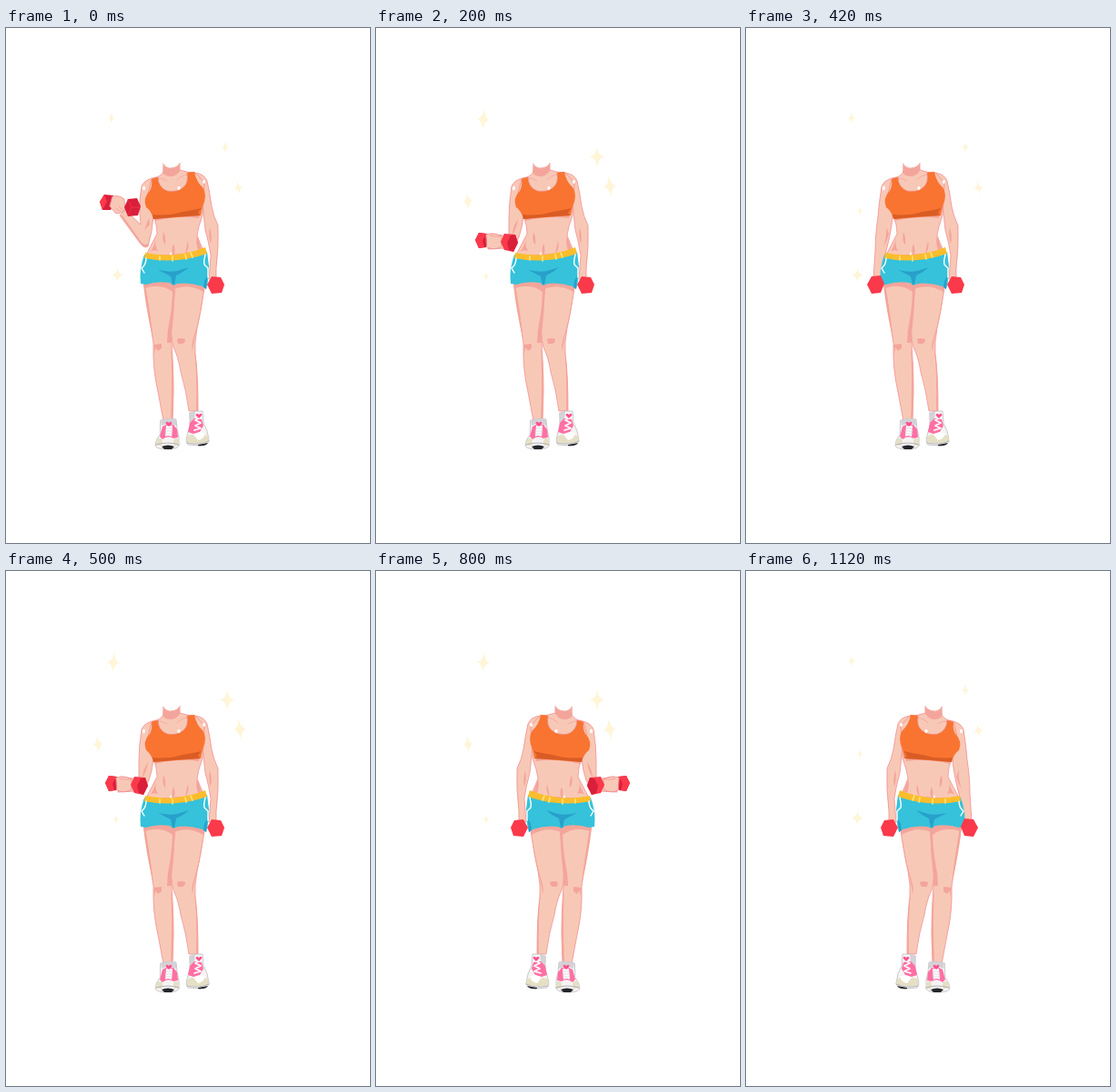
Write an HTML page with a canvas that moves like this. It is 400x566 px and loops after 1.2 s.

```html
<!DOCTYPE html>
<html lang="en">
<head>
<meta charset="utf-8">
<title>Dumbbell curls</title>
<style>
html, body { margin: 0; width: 100%; height: 100%; overflow: hidden; background: #fff; }
canvas { display: block; width: 400px; height: 566px; }
</style>
</head>
<body>
<canvas id="stage"></canvas>
<script>
const canvas = document.getElementById('stage');
const ctx = canvas.getContext('2d');
const ratio = window.devicePixelRatio || 1;
canvas.width = 400 * ratio;
canvas.height = 566 * ratio;

const SKIN = '#f8c8b6', SHADE = '#f4a59b', EDGE = '#ef858a';
const RED = '#fa394b', DEEP_RED = '#d91f3a';
const ORANGE = '#f97430', DEEP_ORANGE = '#da5c25';
const AQUA = '#35c2da', DEEP_AQUA = '#28a0cb';
const GOLD = '#fbbd2c', PINK = '#ff6fa3', HOT_PINK = '#ff4f8d';
const LEATHER = '#f5f4f2', GREY = '#d3d2d7', CREAM = '#e5dfc4', SOLE = '#25242a';

function fill(color, d) {
  ctx.fillStyle = color;
  ctx.fill(new Path2D(d));
}

function line(color, width, d) {
  ctx.strokeStyle = color;
  ctx.lineWidth = width;
  ctx.stroke(new Path2D(d));
}

function skin(d) {
  fill(SKIN, d);
  line(EDGE, 0.7, d);
}

function dot(x, y, rx, ry) {
  ctx.fillStyle = '#fff';
  ctx.beginPath();
  ctx.ellipse(x, y, rx, ry, 0, 0, Math.PI * 2);
  ctx.fill();
}

function sparkle([x, y, w, h, tilt]) {
  ctx.save();
  ctx.translate(x, y);
  ctx.rotate(tilt);
  ctx.fillStyle = '#fff5d8';
  ctx.beginPath();
  ctx.moveTo(0, -h);
  ctx.quadraticCurveTo(w * 0.12, -h * 0.12, w, 0);
  ctx.quadraticCurveTo(w * 0.12, h * 0.12, 0, h);
  ctx.quadraticCurveTo(-w * 0.12, h * 0.12, -w, 0);
  ctx.quadraticCurveTo(-w * 0.12, -h * 0.12, 0, -h);
  ctx.fill();
  ctx.restore();
}

// x, y, half width, half height, tilt
const sparkles = {
  small: [[116, 99, 4, 6.5, 0.05], [241, 131, 4, 6.5, 0.05], [255.5, 175.5, 5, 7.5, -0.2], [122.5, 271.5, 6.5, 8, 0.05], [125, 201, 3, 5.5, 0]],
  large: [[118, 100.5, 7, 12, 0.1], [243, 141.5, 8, 11.5, 0], [257, 174, 7, 12.5, -0.12], [101, 190.5, 5.5, 10, -0.1], [121, 273, 3.5, 5.5, 0]]
};

const arms = {
  up() {
    skin('M165 164Q152 166 149 174Q146 190 147 203L148 216L131 200L125 206L147 236Q152 243 156 240Q161 224 162 206L163 180Z');
    fill(SHADE, 'M126 206L147 236Q152 243 156 240L157 236Q154 240 149 236L128 206Z');
    fill(SHADE, 'M157 209L152 222L158 216Z');
  },
  mid() {
    skin('M165 164Q152 166 149 174Q146 192 146 209L146 229L126 226L123 243L143 242Q154 239 157 230Q161 219 162 206L163 180Z');
    fill(SHADE, 'M156 210Q150 219 150 227Q155 219 156 210Z');
  },
  down() {
    skin('M165 164Q152 166 149 174Q146 193 145 207Q142 228 142 244L140 275H150L153 249Q158 231 160 217L162 198Z');
    fill(SHADE, 'M154 219Q155 228 151 240Q155 234 157 226Z');
    fill(SHADE, 'M153 247L149 274H150L154 247Z');
  }
};

const weights = {
  up() {
    fill(DEEP_RED, 'M103 191L108 183L118 184L119 192L115 200L106 200Z');
    fill(RED, 'M103 191L108 183L111 191L106 200Z');
    skin('M117 185Q124 183 130 188L131 199Q125 206 120 203L114 196Z');
    line(SHADE, 1, 'M121 198L126 202M124 196L128 200');
    fill(DEEP_RED, 'M130 197L134 188L144 187L148 196L145 206L134 207Z');
    line(RED, 0.7, 'M134 188L138 197L134 206M138 197H147');
  },
  mid() {
    fill(DEEP_RED, 'M109 233L113 225L122 226L124 234L121 241L113 242Z');
    fill(RED, 'M109 233L113 225L121 226L117 234L119 241L113 242Z');
    skin('M121 227Q130 224 138 229V240Q130 245 122 241Z');
    line(SHADE, 1, 'M125 228Q132 230 138 229');
    fill(RED, 'M137 235L141 226L153 227L156 236L151 246L141 244Z');
    fill(DEEP_RED, 'M144 236L148 228L153 227L156 236L151 246L146 244Z');
  },
  down() {
    fill(RED, 'M133 282L138 273L148 272L152 281L148 291L138 292Z');
  }
};

function drawLegs() {
  skin('M186 277L219 280Q214 312 210 330Q207 346 208 358Q211 379 211 421H201Q198 398 192 378Q189 360 184 351Q180 338 182 310Z');
  fill(SHADE, 'M217 287Q213 319 207 337Q203 349 205 355Q206 344 210 330Q216 307 217 287Z');
  fill(SHADE, 'M207 353Q210 380 209 420H211Q211 379 208 358Z');
  fill(SHADE, 'M188 342Q192 340 197 342Q197 346 194 347H189Z');
  skin('M151 279L186 279Q184 307 181 337Q184 365 184 400L183 432H173L167 400Q161 374 162 347Q158 316 151 279Z');
  fill(SHADE, 'M186 283Q185 314 181 346L177 346Q177 333 180 320Q183 303 183 283Z');
  fill(SHADE, 'M181 351Q183 382 181 431H183Q186 379 181 351Z');
  fill(SHADE, 'M151 282Q154 310 162 345Q159 316 153 282Z');
  fill(SHADE, 'M162 348L171 347L171 352L167 355L164 351V358Z');
  fill(SHADE, 'M151 279H219L217 290Q202 281 187 286L183 290Q170 280 153 286Z');
}

function drawTorso() {
  skin('M173 149Q177 155 183 153Q188 153 191 148V156Q199 159 208 159L218 170L216 206Q211 219 210 228Q213 236 218 247L153 251Q160 238 166 226Q166 216 162 207L154 190L160 166Q171 163 173 158Z');
  fill('#fff', 'M172 147L173 149Q177 155 183 153Q188 153 191 148V146Z');
  fill(SHADE, 'M173 150Q177 155 183 154Q188 153 191 149V157Q186 164 180 163Q175 163 172 159Z');
  line(SHADE, 0.8, 'M165 165Q171 164 177 168M188 167Q192 162 200 161');
  fill(SHADE, 'M163 208L213 205L212 209Q187 206 164 212Z');
  fill(SHADE, 'M173 224Q176 231 175 238Q171 234 173 224Z');
  fill(SHADE, 'M184 237Q181 245 184 250Q187 244 184 237Z');
  fill(SHADE, 'M200 234Q202 242 197 249Q198 241 200 234Z');
  fill(SHADE, 'M165 229Q163 239 167 245Q162 243 159 246Q164 238 165 229Z');
  fill(SHADE, 'M210 228Q208 236 211 244L215 243Q212 235 210 228Z');
}

function drawTop() {
  fill(ORANGE, 'M160 166L167 164Q167 175 177 179Q188 181 195 175Q201 170 199 159L207 158Q209 169 216 175Q222 183 216 196L214 206Q188 208 162 210Q160 201 154 197Q150 187 158 179Q161 174 160 166Z');
  fill(DEEP_ORANGE, 'M161 205Q178 207 194 202Q206 200 215 198Q208 204 214 206Q188 207 162 210Z');
  line(EDGE, 0.6, 'M167 164Q167 175 177 179Q188 181 195 175Q201 170 199 159');
}

function drawShorts() {
  fill(AQUA, 'M152 249Q187 258 221 246L223 262Q223 278 220 287L216 284Q202 279 188 281L184 283L180 280Q165 278 154 282L148 281Q146 266 152 249Z');
  fill(DEEP_AQUA, 'M167 266Q181 269 188 267L201 263Q194 269 187 272L185 282H183L181 273Q174 269 167 266Z');
  fill(DEEP_AQUA, 'M218 278L221 272L220 287L217 285Z');
  fill(GOLD, 'M153 247Q186 254 219 241L221 248Q187 260 152 253Z');
  line('#ffe47c', 1.6, 'M169 251V255M183 251V256M197 249L198 254M203 247L205 252');
  line('#fff', 1.4, 'M154 253Q154 260 149 264L152 269M219 249Q217 257 218 260L222 264V274');
}

function heart(x, y) {
  fill(HOT_PINK, `M${x} ${y + 3}l-3.5 -3.5q0.5 -3 3.5 -0.5q3 -2.5 3.5 0.5Z`);
}

function drawFrontShoe() {
  const upper = 'M170 431Q179 428 187 430L188 441Q191 449 190 459Q188 463 178 463Q165 463 164 459Q164 453 169 447Z';
  fill(LEATHER, upper);
  line('#b6b4b9', 0.7, upper);
  fill(GREY, 'M170 431Q179 428 187 430V437Q179 433 171 437Z');
  fill(PINK, 'M172 438L176 436H184L188 441L189 450L184 451Q178 447 172 452L169 449Z');
  fill('#fff', 'M176 437H183L182 449Q178 447 175 449Z');
  line(GREY, 0.8, 'M176 440H182M175 443H183M175 446H183');
  heart(179, 435);
  fill(CREAM, 'M166 452Q171 449 172 454L171 459L165 458ZM189 452Q185 449 184 454L185 459L190 458Z');
  line('#a6a4a9', 0.8, 'M165 458Q178 454 190 458');
  fill(SOLE, 'M171 460Q178 457 185 460L182 463H174Z');
}

function drawSideShoe() {
  const upper = 'M202 423Q209 420 216 421L217 434Q222 442 223 453Q223 458 213 459L200 458Q197 455 199 448L202 437Z';
  fill(LEATHER, upper);
  line('#b6b4b9', 0.7, upper);
  fill(GREY, 'M202 423L208 421L207 430L202 434Z');
  fill(PINK, 'M202 434L207 429L215 430L217 437L213 444L206 446L200 444Z');
  line('#fff', 1.8, 'M209 424L215 427L208 431L214 434L208 437L214 440L207 442');
  heart(212, 426);
  fill(CREAM, 'M199 449Q205 445 211 449Q217 444 222 449L223 454Q211 458 199 455Z');
  fill('#fff', 'M206 447Q212 442 219 446Q217 452 211 453Z');
  line('#a6a4a9', 0.8, 'M199 456Q212 459 223 454');
  fill(SOLE, 'M211 458L222 456Q219 460 211 459Z');
}

function drawFigure(pose) {
  ctx.lineJoin = ctx.lineCap = 'round';
  skin('M207 159Q218 160 221 168Q224 181 226 196Q228 207 233 217Q234 239 231 264L231 276H223L225 250Q223 236 219 222L216 194Z');
  fill(SHADE, 'M224 219Q227 230 225 237Q222 228 224 219Z');
  arms[pose]();
  drawLegs();
  drawTorso();
  drawTop();
  drawShorts();
  fill(RED, 'M221 282L226 273L236 274L240 282L237 291L226 292Z');
  weights[pose]();
  dot(151.5, 176, 1.6, 2.2);
  dot(190, 176, 1.6, 2);
  dot(217.5, 169, 1.4, 2);
  dot(181, 248, 1, 1.5);
  drawFrontShoe();
  drawSideShoe();
}

const LOOP = 1200;
const MIRROR = 388;
const steps = [
  { at: 0, pose: 'up' },
  { at: 200, pose: 'mid' },
  { at: 300, pose: 'down' },
  { at: 500, pose: 'mid' },
  { at: 700, pose: 'up', mirrored: true },
  { at: 800, pose: 'mid', mirrored: true },
  { at: 1000, pose: 'down', mirrored: true }
];

function render(time) {
  const { pose, mirrored } = steps.findLast(step => step.at <= time % LOOP);
  ctx.setTransform(ratio, 0, 0, ratio, 0, 0);
  ctx.fillStyle = '#fff';
  ctx.fillRect(0, 0, 400, 566);
  sparkles[pose === 'mid' ? 'large' : 'small'].forEach(sparkle);
  if (mirrored) {
    ctx.translate(MIRROR, 0);
    ctx.scale(-1, 1);
  }
  drawFigure(pose);
}

const start = performance.now();
function tick() {
  render(performance.now() - start);
  requestAnimationFrame(tick);
}
tick();
</script>
</body>
</html>
```
